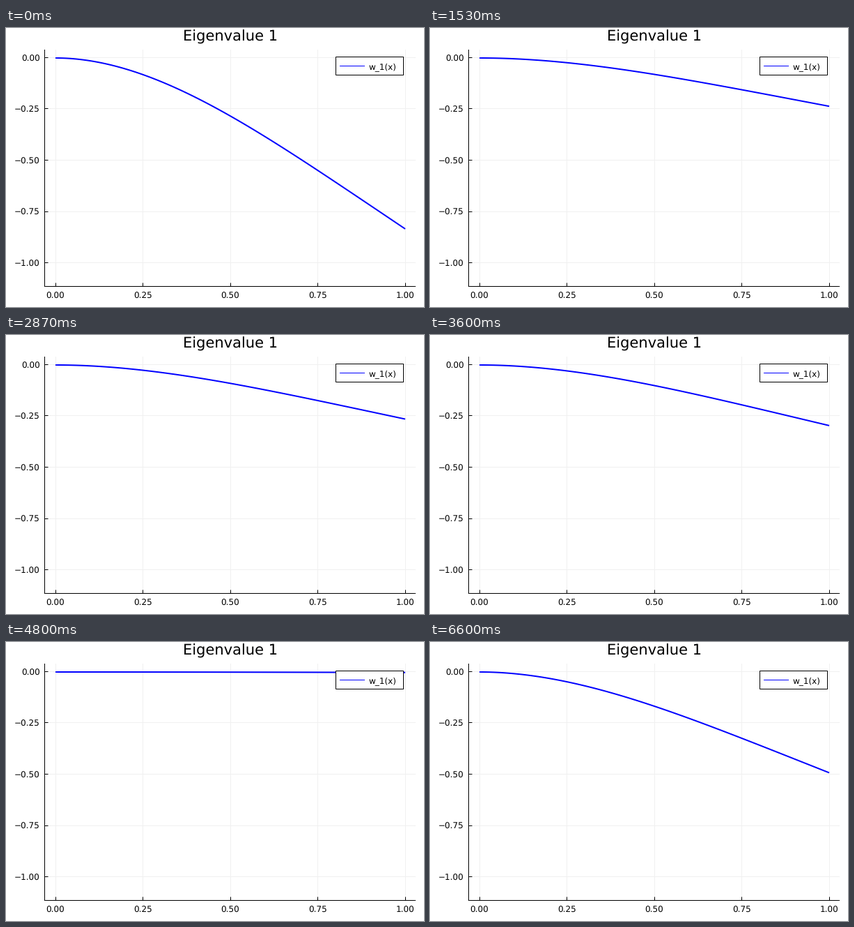
Animation, 600 px wide and 400 px high, one loop 6670 ms. Source, as a matplotlib script:

```python
import numpy as np
import matplotlib.pyplot as plt
from matplotlib.animation import FuncAnimation
from matplotlib.patches import Rectangle

W, H, DPI = 600, 400, 100
TICK, LOOP, FPS, STEPS = 23, 6670, 15, 100   # the beam moves at 15 steps a second
PX = 72 / DPI                                # one pixel in points
LEFT, RIGHT, TOP, BOTTOM = 55.5, 588, 31, 370.5
X0, XS, Y0, YS = 71, 502, 43, 294.5

plt.rcParams["font.family"] = "DejaVu Sans"
plt.rcParams["text.hinting"] = "none"
fig = plt.figure(figsize=(W / DPI, H / DPI), dpi=DPI, facecolor="white")
ax = fig.add_axes([0, 0, 1, 1])
ax.set(xlim=(0, W), ylim=(H, 0))
ax.axis("off")


def line(xs, ys, color="black", width=1, z=2):
    return ax.plot(xs, ys, color=color, lw=width * PX, zorder=z, snap=False,
                   solid_capstyle="butt", solid_joinstyle="round")[0]


def label(x, y, text, size=12, ha="center", z=3):
    ax.text(x, y, text, fontsize=size * PX, ha=ha, va="baseline", zorder=z)


def mode(x, k=1.8751041):
    """First bending mode of a clamped-free beam, unit tip deflection."""
    s = (np.cosh(k) + np.cos(k)) / (np.sinh(k) + np.sin(k))

    def shape(u):
        return np.cosh(u) - np.cos(u) - s * (np.sinh(u) - np.sin(u))
    return shape(k * x) / shape(k)


def spline(t, v, start, end):
    """Clamped cubic spline through (t, v) as a function of time."""
    n, h = len(t), np.diff(t)
    d = np.diff(v) / h
    a, b = np.eye(n), np.zeros(n)
    b[0], b[-1] = start, end
    for i in range(1, n - 1):
        p, q = 1 / h[i - 1], 1 / h[i]
        a[i, i - 1:i + 2] = p, 2 * (p + q), q
        b[i] = 3 * (d[i - 1] * p + d[i] * q)
    m = np.linalg.solve(a, b)

    def at(x):
        i = min(max(np.searchsorted(t, x, "right") - 1, 0), n - 2)
        u = (x - t[i]) / h[i]
        return (v[i] * (1 + 2 * u) * (1 - u) ** 2 + v[i + 1] * u * u * (3 - 2 * u)
                + h[i] * u * (1 - u) * (m[i] * (1 - u) - m[i + 1] * u))
    return at


# Tip deflection over the loop, by step
KEYS = np.array([(0, .832), (11, .629), (15, .4855), (21, .285), (33, .1475),
                 (42, .251), (50, .311), (54, .295), (63, .146), (72, .0024),
                 (75, -.0075), (84, .124), (95, .428), (99, .4905)])
tip = spline(KEYS[:, 0], KEYS[:, 1], 0, .009)

# Grid, ticks and labels, with lines on pixel centres
for i in range(5):
    q = i / 4
    x, y = X0 + XS * q, Y0 + YS * q
    col, row = np.floor(x) + .5, np.floor(y - .7) + .5
    line([col, col], [TOP, BOTTOM], "0.94", z=0)
    line([LEFT, RIGHT], [row, row], "0.94", z=0)
    line([col, col], [BOTTOM, BOTTOM - 5])
    line([LEFT, LEFT + 5], [row, row])
    label(x, 387.4, f"{q:.2f}")
    label(48.5, y + 4.4, ("\u2212" if i else "") + f"{q:.2f}", ha="right")
line([LEFT, LEFT], [TOP, BOTTOM + .5])
line([LEFT - .5, RIGHT], [BOTTOM, BOTTOM])
label(322, 18.3, "Eigenvalue 1", 21)

# Legend
ax.add_patch(Rectangle((473.5, 41.5), 97, 26, fc="white", ec="black",
                       lw=PX, zorder=5, snap=False))
line([479, 515], [54.5, 54.5], "blue", z=6)
label(520.4, 59, "w_1(x)", ha="left", z=6)

xs = np.linspace(0, 1, 101)
phi = mode(xs)
curve = line(X0 + XS * xs, Y0 + 0 * xs, "blue", 2, z=4)


def update(n):
    step = min((n + 1) * TICK * FPS // 1000, STEPS - 1)
    curve.set_ydata(Y0 + YS * tip(step) * phi)
    return curve,


anim = FuncAnimation(fig, update, frames=LOOP // TICK, interval=TICK,
                     init_func=lambda: update(0), repeat=True, repeat_delay=0)
plt.show()
```
